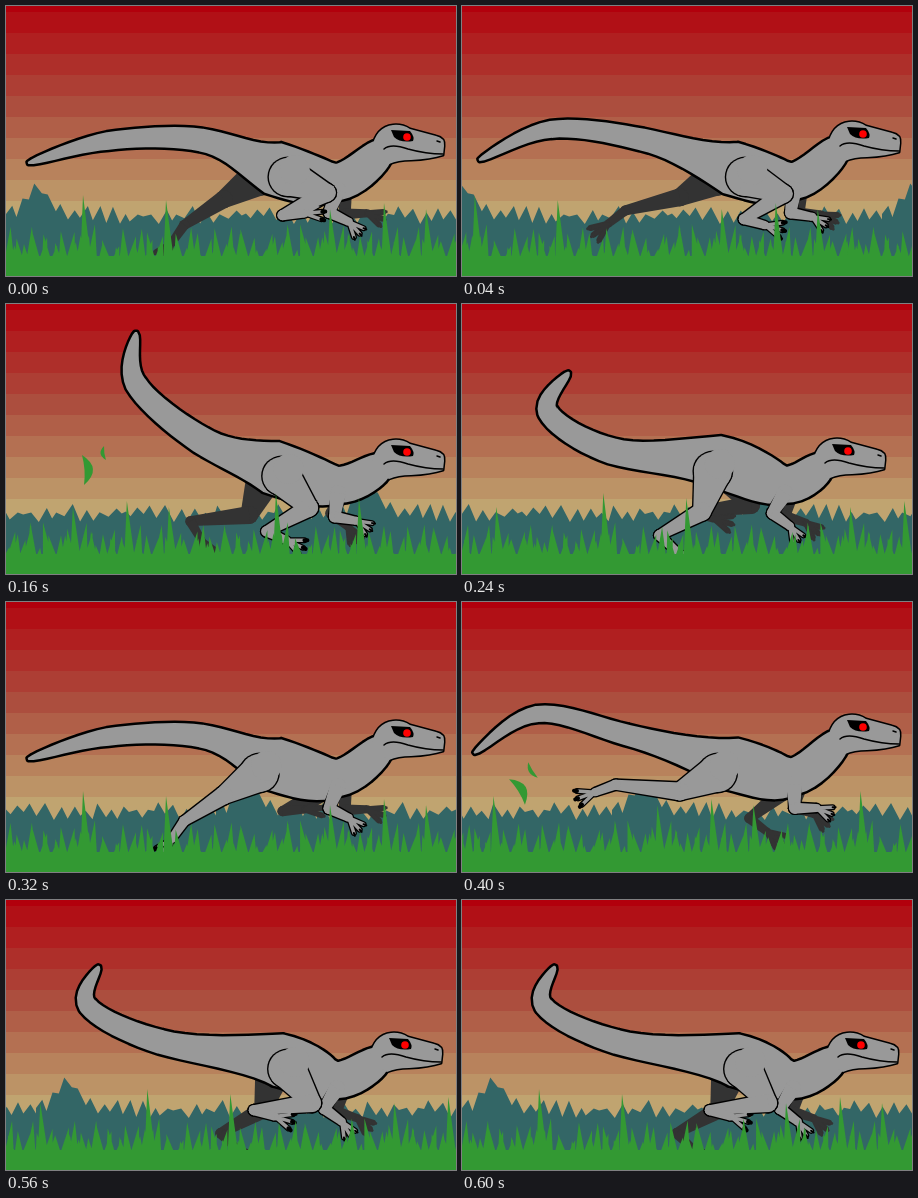
These frames come from a looping animation (450x270 px, 0.64 s). An HTML page with a canvas:

```html
<!DOCTYPE html>
<html lang="en">
<head>
<meta charset="utf-8">
<title>Running raptor</title>
<style>
html, body { margin: 0; width: 100%; height: 100%; overflow: hidden; }
canvas { display: block; }
</style>
</head>
<body>
<canvas id="stage" width="450" height="270"></canvas>
<script>
const W = 450, H = 270, STEP = 40, FRAMES = 16, TAU = Math.PI * 2;
const ctx = document.getElementById('stage').getContext('2d');
const GREY = '#999', DARK = '#333', GREEN = '#393', BLACK = '#000';
const lerp = (a, b, k) => a + (b - a) * k;
const mix = (a, b, k) => a.map((v, i) => lerp(v, b[i], k));
const rad = deg => deg * Math.PI / 180;

let seed = 11;
const rnd = () => (seed = seed * 16807 % 2147483647) / 2147483647;

// Head offset, tail tip, two tail points, hip
const leap = [0, 0, 22,157, 102,135, 195,134, 267,162];
const rise = [0, -6, 12,151, 75,112, 165,133, 270,162];
const glide = [2, 7, 46,133, 105,115, 185,123, 270,166];
const whip = [0, 17, 130,28, 130,80, 195,136, 265,163];
const curl = [-15, 16, 107,68, 86,108, 150,147, 255,158];
const curl2 = [-2, 14, 93,66, 82,106, 155,142, 272,160];
const body = { 0: leap, 2: rise, 3: glide, 4: whip, 6: curl,
  8: leap, 10: rise, 11: glide, 12: whip, 14: curl2 };

// Angles of thigh, shin and foot over one full stride
const stride = { 0: [22, 153, -5], 2: [25, 142, 37], 3: [30, 118, 35], 4: [49, 151, 24],
  6: [105, 151, 43], 8: [148, 147, 125], 10: [154, 186, 160], 12: [112, 174, 60],
  14: [54, 173, 17], 16: [22, 153, -5] };

function pose(track, n) {
  const keys = Object.keys(track).map(Number);
  const a = keys.filter(k => k <= n).pop();
  const b = keys.find(k => k > n) ?? a;
  return mix(track[a], track[b], b > a ? (n - a) / (b - a) : 0);
}

const hills = new Path2D();
hills.moveTo(0, H);
for (let x = 0, i = 0; x < W; x += 4 + 5 * rnd(), i++) {
  const bump = 25 * Math.exp(-(((x - 31) / 17) ** 2));
  hills.lineTo(x, (i % 2 ? 200 : 209) + 9 * rnd() - bump);
}
hills.lineTo(W, 207);
hills.lineTo(W, H);

const grass = new Path2D();
function blade(x, top, lean) {
  grass.moveTo(x - 6, 262);
  grass.lineTo(x + lean, top);
  grass.lineTo(x + 6, 262);
}
for (let x = 3; x < W; x += 5.5) blade(x, 218 + 26 * rnd(), 12 * rnd() - 6);
[[80,189], [163,194], [327,203], [381,197], [423,203]].forEach(([x, y]) => blade(x, y, -3));

function tile(path, shift, color) {
  ctx.fillStyle = color;
  for (const x of [-shift % W, W - shift % W]) {
    ctx.save();
    ctx.translate(x, 0);
    ctx.fill(path);
    ctx.restore();
  }
}

function sky() {
  const top = [178, 0, 12], mid = [172, 78, 62], low = [192, 164, 112];
  for (let i = 0; i <= 10; i++) {
    const c = i < 5 ? mix(top, mid, i / 5) : mix(mid, low, (i - 5) / 5);
    ctx.fillStyle = `rgb(${c.map(Math.round)})`;
    ctx.fillRect(0, i ? 6 + (i - 1) * 21 : 0, W, H);
  }
}

const spline = (a, b, c, d, u) =>
  b + u / 2 * (c - a + u * (2 * a - 5 * b + 4 * c - d + u * (3 * (b - c) + d - a)));

// Outline of a curved spine with a radius at each point
function ribbon(points, radii) {
  const spine = [], last = points.length - 1;
  const at = i => points[Math.max(0, Math.min(last, i))];
  for (let i = 0; i < last; i++) {
    for (let u = 0; u < 1; u += .1) {
      const [x, y] = [0, 1].map(k => spline(at(i - 1)[k], at(i)[k], at(i + 1)[k], at(i + 2)[k], u));
      // The taper is blunt at the tail tip and late near the hips
      spine.push([x, y, lerp(radii[i], radii[i + 1], u ** (.7 + .6 * i))]);
    }
  }
  const side = s => spine.map(([x, y, r], i) => {
    const p = spine[Math.max(0, i - 1)], q = spine[Math.min(spine.length - 1, i + 1)];
    const a = Math.atan2(q[1] - p[1], q[0] - p[0]);
    return [x + s * r * Math.sin(a), y - s * r * Math.cos(a)];
  });
  const path = new Path2D();
  [...side(1), ...side(-1).reverse()].forEach(p => path.lineTo(...p));
  path.closePath();
  return path;
}

// Joints from a start point and [angle, length] bones
function chain(start, bones) {
  const joints = [start];
  for (const [deg, len] of bones) {
    const [x, y] = joints[joints.length - 1];
    joints.push([x + len * Math.cos(rad(deg)), y + len * Math.sin(rad(deg))]);
  }
  return joints;
}

function dot(x, y, r, color) {
  ctx.fillStyle = color;
  ctx.beginPath();
  ctx.arc(x, y, r, 0, TAU);
  ctx.fill();
}

function limb(joints, r, color) {
  for (let i = 0; i < r.length - 1; i++) {
    const [x, y] = joints[i], [u, v] = joints[i + 1];
    const a = Math.atan2(v - y, u - x), s = -Math.sin(a), c = Math.cos(a);
    dot(x, y, r[i], color);
    dot(u, v, r[i + 1], color);
    ctx.beginPath();
    ctx.moveTo(x + s * r[i], y + c * r[i]);
    ctx.lineTo(u + s * r[i + 1], v + c * r[i + 1]);
    ctx.lineTo(u - s * r[i + 1], v - c * r[i + 1]);
    ctx.lineTo(x - s * r[i], y - c * r[i]);
    ctx.fill();
  }
}

function digits(joints, color, edge, claw) {
  const [[x, y], [u, v]] = joints.slice(-2);
  const a = Math.atan2(v - y, u - x), len = Math.hypot(u - x, v - y);
  const fan = (from, to, width, style) => {
    ctx.lineWidth = width;
    ctx.strokeStyle = style;
    ctx.beginPath();
    for (const t of [a - .42, a, a + .42]) {
      ctx.moveTo(x + Math.cos(t) * from, y + Math.sin(t) * from);
      ctx.lineTo(x + Math.cos(t) * to, y + Math.sin(t) * to);
    }
    ctx.stroke();
  };
  fan(0, len, 6, edge);
  fan(0, len, 3.5, color);
  fan(len, len + 3, claw, edge);
}

function farLimb(joints, radii) {
  limb(joints, radii, DARK);
  digits(joints, DARK, DARK, 3);
}

function nearLimb(joints, radii, rootEdge, claw) {
  limb(joints, radii.map((r, i) => r + (i ? 1.4 : rootEdge)), BLACK);
  digits(joints, GREY, BLACK, claw);
  limb(joints, radii, GREY);
}

const LEG = [19, 9, 5, 4], ARM = [8, 5.5, 4];

function legAt([x, y], n) {
  const [thigh, shin, foot] = pose(stride, n % FRAMES);
  const shinLen = 34 + .45 * (shin - 118); // foreshortened while under the body
  return chain([x + 16 * Math.cos(rad(thigh)), y + 9],
    [[thigh, 42], [shin, shinLen], [foot, 22], [foot, 18]]);
}

function armAt([x, y], n) {
  const swing = Math.cos(TAU * (n - 2.5) / 8), fore = 18 - 20 * swing;
  return chain([x, y + 8], [[105 - 18 * swing, 24], [fore, 22], [fore + 22, 16]]);
}

const skull = new Path2D('M366 142Q370 121 387 119Q396 118 404 123L430 130Q439 132 438 140' +
  'L437 149Q425 153 405 154Q392 154 383 158L372 152Z');
const brow = new Path2D('M385 124L404 125Q409 131 407 135Q394 137 388 131Z');
const mouth = new Path2D('M378 143Q385 137 402 143Q420 148 437 148M431 135l3 1');

function torso(points, tailScale, dx, dy) {
  const shape = ribbon(points, [1, 8.5 * tailScale, 11 * tailScale, 26, 18, 12]);
  const head = new Path2D();
  head.addPath(skull, new DOMMatrix([1, 0, 0, 1, dx, dy]));
  ctx.strokeStyle = BLACK;
  ctx.lineWidth = 3;
  ctx.stroke(head);
  ctx.lineWidth = 5;
  ctx.stroke(shape);
  ctx.fillStyle = GREY;
  ctx.fill(shape);
  ctx.fill(head);

  ctx.save();
  ctx.translate(dx, dy);
  ctx.lineWidth = 1.5;
  ctx.stroke(mouth);
  ctx.fillStyle = BLACK;
  ctx.fill(brow);
  dot(401, 131, 3.8, '#f00');
  ctx.restore();
}

function raptor(n) {
  const [dx, dy, ...p] = pose(body, n);
  const tail = [0, 2, 4, 6].map(i => [p[i], p[i + 1]]);
  const hip = tail[3];
  const chest = [332 + dx * .6, 176 + dy * .3], nape = [378 + dx, 144 + dy];
  const length = [0, 1, 2].reduce((sum, i) =>
    sum + Math.hypot(tail[i + 1][0] - tail[i][0], tail[i + 1][1] - tail[i][1]), 0);

  farLimb(legAt(hip, n + FRAMES / 2), LEG);
  farLimb(armAt([chest[0] + 6, chest[1]], n + 2.5), ARM);
  torso([...tail, chest, nape], 262 / length, dx, dy); // a shorter tail is thicker
  nearLimb(armAt(chest, n), ARM, -1, 2);
  const leg = legAt(hip, n);
  nearLimb(leg, LEG, 1.4, 4);
  dot(leg[0][0] + 7, leg[0][1] - 7, 15, GREY); // blends the thigh into the flank
}

function leaf(x, y, angle, len, bulge) {
  ctx.save();
  ctx.translate(x, y);
  ctx.rotate(rad(angle));
  ctx.fillStyle = GREEN;
  ctx.beginPath();
  ctx.moveTo(-len / 2, 0);
  ctx.quadraticCurveTo(0, bulge, len / 2, 0);
  ctx.quadraticCurveTo(0, bulge * .15, -len / 2, 0);
  ctx.fill();
  ctx.restore();
}

// Each push-off tears up two leaves
function kick(age, x, y, angle) {
  if (age < -1 || age > 2) return;
  leaf(x - 18 * age, y - 9 * age, angle - 4 * age, 30, -20);
  leaf(x + 16 - 12 * age, y - 22 - 4 * age, angle - 8 * age, 18 - 4 * age, 9);
}

function draw() {
  const n = Math.floor(performance.now() / STEP) % FRAMES;
  ctx.lineJoin = ctx.lineCap = 'round';
  sky();
  tile(hills, n * 30, '#366');
  raptor(n % 8 === 7 ? n - 1 : n); // each half stride ends on a held pose
  kick(n - 3, 95, 175, 90);
  kick(n - 10, 55, 190, 58);
  tile(grass, n % 8 * W / 7, GREEN);
  ctx.fillRect(0, 250, W, 20);
  requestAnimationFrame(draw);
}
draw();
</script>
</body>
</html>
```
